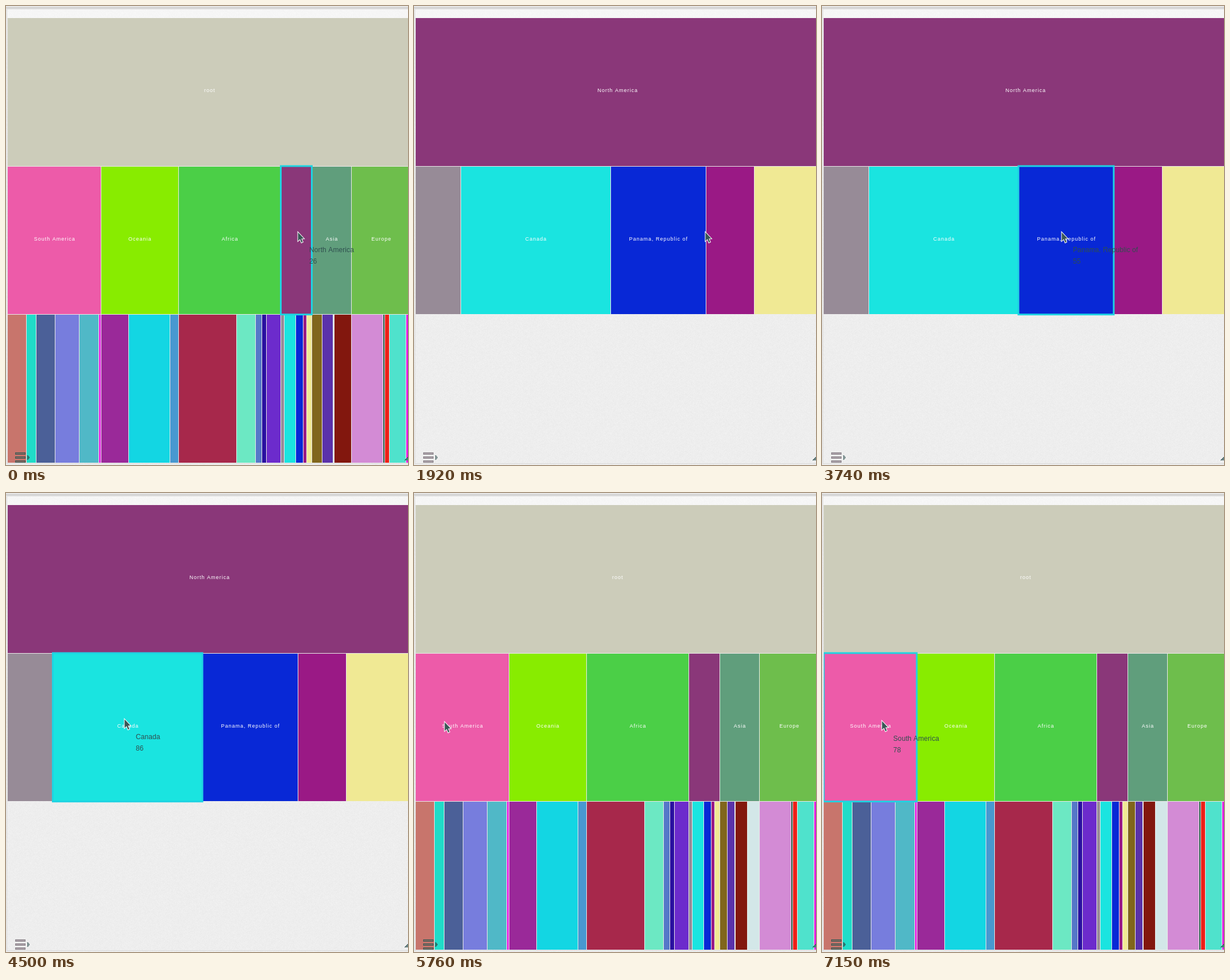
Recreate the animation shown at these times as an HTML page with a canvas. Size 700x800 px, loop 8000 ms.

```html
<!DOCTYPE html>
<html lang="en">
<head>
<meta charset="utf-8">
<title>Icicle chart</title>
<style>
html, body { margin: 0; width: 100%; height: 100%; overflow: hidden; background: #ededed; }
canvas { display: block; }
</style>
</head>
<body>
<canvas id="stage" width="700" height="800"></canvas>
<script>
const ctx = document.getElementById('stage').getContext('2d');
const LOOP = 8000, INK = '#2f4f4f', SEAM = '#ebe9e9';

// Each cell: [left edge, colour, name, value, label shown]
const continents = [
  [3, '#ed5ba9', 'South America', 78, true],
  [165, '#88ec00', 'Oceania', 65, true],
  [300, '#4bcf47', 'Africa', 86, true],
  [478.5, '#8a3779', 'North America', 26, false],
  [532.5, '#609e7c', 'Asia', 33, true],
  [601, '#6ebe4c', 'Europe', 50, true]
];
const countries = [
  [3, '#978b97', 'United States of America', 26, false],
  [81.5, '#1ae4e0', 'Canada', 86, true],
  [342, '#0828d6', 'Panama, Republic of', 55, true],
  [508, '#9a1985', 'Mexico', 28, false],
  [592.5, '#f0e994', 'Cuba', 37, false]
];
const westLeaves = [
  [3, '#c8756c'], [35, '#20dcc8'], [52, '#4b6098'], [85, '#777ddd'], [127, '#50b8c7'],
  [161, '#e424e4'], [165, '#9a2999'], [213, '#13d6e3'], [285, '#4898d0'],
  [300, '#a7284b'], [401, '#6ce8c3'], [434, '#5577c8'], [445, '#2a10a0'], [453, '#6c2bcc'],
  [478, '#978b97'], [484, '#1ae4e0'], [504, '#0828d6'], [517, '#9a1985'], [523, '#f0e994']
];
const eastLeaves = [
  [601, '#d38bd5'], [656, '#205040'], [659, '#ee2018'], [667, '#4fe2cc'], [696, '#e020e0']
];
const asiaColors = ['#80661c', '#5a32aa', '#d3e7e8', '#82170e', '#d3e7e8'];
const leaves = asia => [...westLeaves, ...asia.map((x, i) => [x, asiaColors[i]]), ...eastLeaves];
const leavesBefore = leaves([532, 550, 569, 571]);
const leavesAfter = leaves([532, 545, 558, 559, 580]);

// Pointer moves: [start, end, steps, x0, y0, x1, y1]
const moves = [
  [0, 40, 2, 507, 393, 506, 393],
  [2890, 3180, 8, 497, 393, 416, 393],
  [3740, 4200, 12, 416, 393, 212, 393],
  [4460, 4990, 14, 208, 393, 52, 398],
  [6170, 6690, 12, 53, 398, 206, 397],
  [6900, 7150, 7, 203, 397, 103, 396]
];

function pointer(t) {
  const [start, end, n, x0, y0, x1, y1] = moves.filter(m => m[0] <= t).pop();
  const k = Math.min(n - 1, Math.floor((t - start) / (end - start) * (n - 1) + 1e-6));
  const p = k / (n - 1), e = p * p * (3 - 2 * p);
  return [Math.round(x0 + (x1 - x0) * e), Math.round(y0 + (y1 - y0) * e)];
}

function linen() {
  const tile = document.createElement('canvas'), size = 100;
  tile.width = tile.height = size;
  const tc = tile.getContext('2d');
  let seed = 7;
  const rnd = () => (seed = (seed * 16807) % 2147483647) / 2147483647;
  for (let y = 0; y < size; y++) for (let x = 0; x < size; x++) {
    const v = Math.round(233 + rnd() * 7 + ((x + y) % 2) * 2);
    tc.fillStyle = `rgb(${v},${v},${v})`;
    tc.fillRect(x, y, 1, 1);
  }
  return ctx.createPattern(tile, 'repeat');
}
const paper = linen();

function box(color, x, y, w, h) {
  ctx.fillStyle = color;
  ctx.fillRect(x, y, w, h);
}

function poly(points, fill, stroke, width = 1) {
  ctx.beginPath();
  points.forEach(([x, y]) => ctx.lineTo(x, y));
  ctx.closePath();
  if (stroke) {
    ctx.strokeStyle = stroke;
    ctx.lineWidth = width;
    ctx.stroke();
  }
  ctx.fillStyle = fill;
  ctx.fill();
}

function text(str, x, y, color, size, spacing, align) {
  ctx.font = `${size}px "Liberation Sans", Arial, sans-serif`;
  ctx.letterSpacing = spacing + 'px';
  ctx.textAlign = align;
  ctx.fillStyle = color;
  ctx.fillText(str, x, y);
}

const rightOf = (cells, i) => i + 1 < cells.length ? cells[i + 1][0] : 705;

function row(cells, top, bottom) {
  cells.forEach(([x, color, name, , shown], i) => {
    const right = rightOf(cells, i);
    box(color, x, top, right - x, bottom - top);
    if (i) box(SEAM, Math.floor(x), top, 1, bottom - top);
    if (shown) text(name, (x + right) / 2 + 0.8, 409, '#fff', 9, 1, 'center');
  });
}

function background() {
  box(paper, 0, 0, 700, 800);
  box('rgba(255,255,255,.45)', 2, 6, 698, 15);
  box('#e5e5e5', 0, 0, 700, 3);
  box('#b4b4b4', 0, 3, 700, 1);
  box('#f4f4f4', 0, 4, 700, 1);
  box('#dadada', 1, 5, 699, 1);
  box('#dadada', 1, 5, 1, 793);
  box('#dadada', 1, 797, 699, 1);
}

function controls(zoomed) {
  const fill = zoomed ? '#aaa0a8' : '#80685f', edge = zoomed ? '#8b858a' : '#3d5a56';
  for (const y of [778, 785, 792]) {
    box(edge, 16, y, 18, 4);
    box(fill, 17, y + 1, 16, 2);
  }
  poly([[37.5, 783], [37.5, 791], [41, 787]], zoomed ? '#8fa0a0' : '#2c7770', INK);
  poly([[694, 792], [700, 786], [700, 792]], zoomed ? '#6f8585' : '#3f7f7a');
  ctx.strokeStyle = INK;
  ctx.lineWidth = 1;
  ctx.beginPath();
  ctx.moveTo(694, 792);
  ctx.lineTo(700, 786);
  ctx.stroke();
}

function highlight(cells, i) {
  ctx.save();
  ctx.beginPath();
  ctx.rect(3, 270, 697, 280);
  ctx.clip();
  ctx.strokeStyle = '#1fd3e2';
  ctx.lineWidth = 3;
  ctx.strokeRect(cells[i][0], 279, rightOf(cells, i) - cells[i][0], 258.7);
  ctx.restore();
}

function arrow(x, y) {
  const shape = [[0, 0], [0, 16], [4, 12.6], [6.8, 19], [9.4, 17.8], [6.6, 11.8], [11.5, 11.5]];
  ctx.lineJoin = 'miter';
  poly(shape.map(([dx, dy]) => [x + 1.5 + dx * 0.88, y + 1.5 + dy * 0.94]), '#3a5656', '#fff', 2);
}

function draw(t) {
  const zoomed = t >= 1920 && t < 5760;
  const cells = zoomed ? countries : continents;
  const [px, py] = pointer(t);
  const hover = cells.filter(c => c[0] <= px).length - 1;

  background();
  box(zoomed ? '#8a3779' : '#ccccba', 3, 21, 697, 258);
  text(zoomed ? 'North America' : 'root', 354.8, 150, '#fff', 9, 1, 'center');
  row(cells, 279, 537);
  if (!zoomed) row(t < 1920 ? leavesBefore : leavesAfter, 538, 796);
  box(SEAM, 3, 279, 697, 1);
  if (!zoomed) box(SEAM, 3, 537, 697, 1);
  controls(zoomed);

  if (t < 350 || (t >= 2890 && t < 5210) || t >= 6170) highlight(cells, hover);
  if (t < 1920 || (t >= 2890 && t < 5760) || t >= 6170) {
    const [, , name, value] = cells[hover];
    text(name, px + 21, py + 36, INK, 12, 0.1, 'left');
    text(value, px + 21, py + 56, INK, 12, 0.1, 'left');
  }
  arrow(px, py);
}

const origin = performance.now();
function tick() {
  draw((performance.now() - origin) % LOOP);
  requestAnimationFrame(tick);
}
tick();
</script>
</body>
</html>
```
